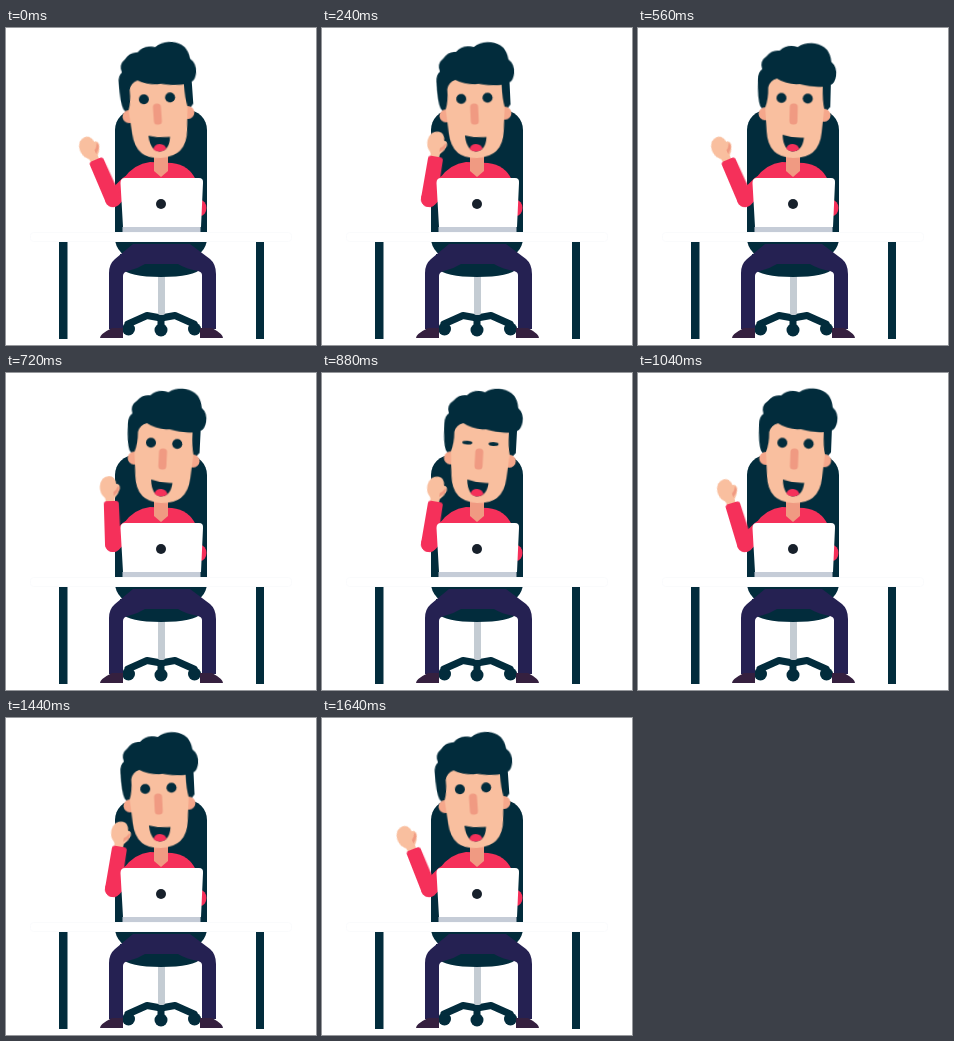
An HTML page for the animation above (1.68 s loop, 310x317 px).

```html
<!DOCTYPE html>
<html lang="en">
<head>
<meta charset="utf-8">
<title>Waving at the desk</title>
<style>
  html, body { margin: 0; width: 100%; height: 100%; overflow: hidden; background: #fff; }
  svg { display: block; width: 100vw; height: 100vh; }
  .dark { fill: #022c3c; }
  .skin { fill: #f9bf9f; }
  .ear { fill: #f5a78b; }
  .shade { fill: #f09a82; }
  .red { fill: #f5305a; }
  .navy { fill: #252152; }
  .shoe { fill: #35203f; }
  .sway, .wave { animation: 840ms cubic-bezier(.37, 0, .63, 1) infinite alternate; }
  .sway { animation-name: sway; transform-origin: 155px 130px; }
  .wave { animation-name: wave; animation-duration: 280ms; transform-origin: 107px 171px; }
  .eye { animation: blink 1680ms linear infinite; transform-box: fill-box; transform-origin: center; }
  @keyframes sway { from { transform: rotate(-4deg); } to { transform: rotate(3.2deg); } }
  @keyframes wave { from { transform: rotate(-23deg); } to { transform: rotate(11.5deg); } }
  @keyframes blink {
    0%, 47.6%, 57.2%, 100% { transform: scaleY(1); }
    51%, 53.8% { transform: scaleY(.38); }
  }
</style>
</head>
<body>
<svg viewBox="0 0 310 317" preserveAspectRatio="none">
  <!-- chair -->
  <path d="M122 296L141 287.500L155 290L169 287.500L188 296M155 290V300" fill="none" stroke="#022c3c" stroke-width="7" stroke-linecap="round" stroke-linejoin="round"/>
  <rect x="152" y="240" width="7" height="47" rx="2" fill="#c4ccd3"/>
  <g class="dark">
    <circle cx="122.500" cy="301" r="6.500"/>
    <circle cx="155" cy="302" r="6.500"/>
    <circle cx="188.500" cy="301" r="6.500"/>
    <rect x="109" y="82" width="92" height="148" rx="20"/>
    <path d="M114 226H196V240Q188 249 155 249Q123 249 115 240Z"/>
  </g>

  <!-- legs -->
  <path class="navy" d="M127 216H184L204 231Q210 236 210 246V301H196V247Q196 244 192 243Q180 241 172 236H139Q131 241 122 243Q117 244 117 248V301H103V245Q103 236 109 231Z"/>
  <path class="shoe" d="M94 310Q94 306 106 300H117V310ZM217 310Q217 306 206 300H194V310Z"/>

  <!-- body -->
  <path class="red" d="M144 134Q128 136 118 150V190H190V152Q183 137 166 135Z"/>
  <path d="M107 171L122 156" stroke="#f5305a" stroke-width="16" stroke-linecap="round"/>
  <ellipse class="red" cx="194" cy="180" rx="6.500" ry="8"/>
  <path class="shade" d="M148 122H162V143L155 149L148 143Z"/>

  <g class="wave">
    <path class="skin" d="M102 134L100.500 125Q95 120 95.500 113Q97 103 105 103Q111 103 112 111Q116 111 115.500 116Q114 121 110 125L109.500 134Z"/>
    <path class="shade" d="M109 119Q112 117 114 113Q117 117 109 123Z"/>
    <path class="red" d="M99 131Q99 128 102 128H111Q114 128 114 131L115 171A8 8 0 0 1 99 171Z"/>
  </g>

  <g class="sway">
    <path class="dark" d="M126 85L121 79Q118 72 118 52Q118 45 122 42Q119 34 126 29Q131 22 139 23Q146 16 157 19Q164 14 174 15Q189 17 191 33Q197 38 196 47Q195 54 191 56V78L186 84Z"/>
    <circle class="ear" cx="126" cy="86.500" r="6.500"/>
    <circle class="ear" cx="185" cy="86.500" r="6.500"/>
    <path class="skin" d="M126 80Q129 72 128.500 60Q130 53 137 51Q147 57 160 56Q174 59 183 58Q183 72 185 80L183 104Q181 130 155 130Q130 130 128 104Z"/>
    <rect class="shade" x="150.500" y="75.500" width="8" height="21" rx="3.500"/>
    <circle class="dark eye" cx="142" cy="70.300" r="5"/>
    <circle class="dark eye" cx="168.300" cy="70.300" r="5"/>
    <path class="dark" d="M144 107Q154 110 165.500 109.500Q164 123.500 154 123.500Q145 122 144 107Z"/>
    <path class="red" d="M148 121Q149 116 154.500 116Q160 116.500 161 121Q158 123.500 154 123.500Q150.500 123 148 121Z"/>
  </g>

  <!-- laptop -->
  <path d="M119 150H193Q197.500 150 197 155L195 199H117L114.500 155Q114.500 150 119 150Z" fill="#fff"/>
  <path d="M116.500 199H194.500V204H116.500Z" fill="#c5ccd7"/>
  <circle cx="155" cy="176" r="5" fill="#17202b"/>

  <!-- desk -->
  <path class="dark" d="M53 213H61.500V311H53ZM250 213H258V311H250Z"/>
  <rect x="24.500" y="204.500" width="261" height="9" rx="3" fill="#fff" stroke="#fafbfc"/>
</svg>
</body>
</html>
```
